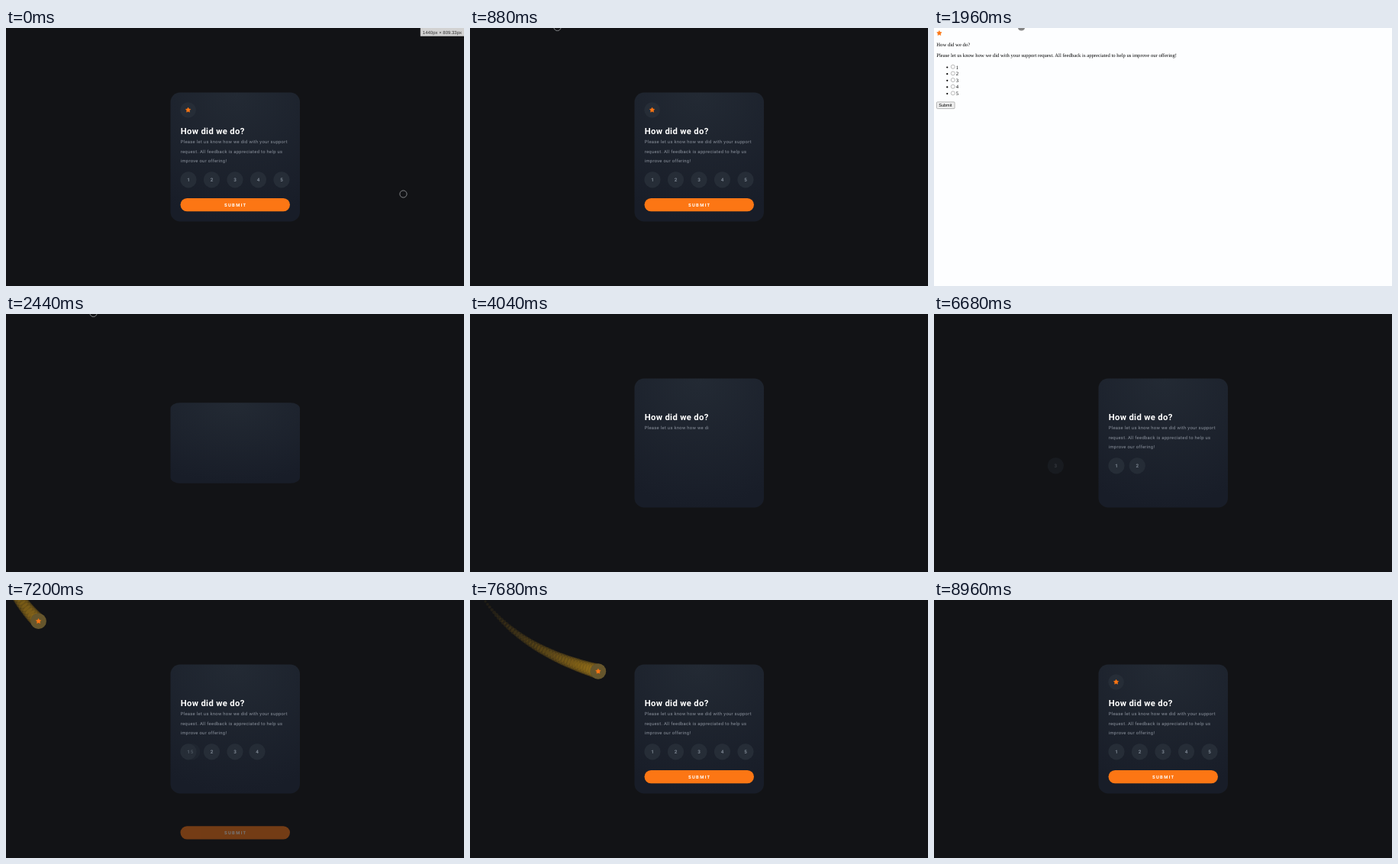
These frames come from a looping animation (600 px wide and 338 px high, 9 s). An HTML page:

```html
<!DOCTYPE html>
<html lang="en">
<head>
<meta charset="utf-8">
<title>Rating card</title>
<style>
  html, body { margin: 0; width: 100%; height: 100%; overflow: hidden; background: #121316; }
  svg { display: block; width: 100%; height: 100%; text-rendering: geometricPrecision; }
  text { white-space: pre; }
  .card { font-family: Roboto, sans-serif; }
  .title { font-size: 11.25px; font-weight: 700; letter-spacing: .33px; fill: #fff; }
  .copy { font-size: 5.83px; letter-spacing: .31px; fill: #8d949f; }
  .num { font-size: 6.3px; font-weight: 700; fill: #7c8591; text-anchor: middle; }
  .label { font-size: 5.83px; font-weight: 700; letter-spacing: 1.35px; fill: #fff; }
  .plain { font: 6.667px "Liberation Serif", serif; }
  .ui { font-family: "Liberation Sans", sans-serif; }
</style>
</head>
<body>
<svg viewBox="0 0 600 338">
  <defs>
    <radialGradient id="shade" cx=".5" cy="0" r="1">
      <stop offset="0" stop-color="#232a34"/>
      <stop offset="1" stop-color="#181d28"/>
    </radialGradient>
  </defs>
  <rect width="600" height="338" fill="#121316"/>
  <g class="card">
    <rect id="panel" x="215.5" y="84.5" width="169.5" height="169" rx="12.5" fill="url(#shade)"/>
    <text id="title" class="title" x="228.7" y="139">How did we do?</text>
    <g id="copy"></g>
    <g id="balls"></g>
    <g id="submit">
      <rect x="228.5" y="223" width="143.5" height="17.2" rx="8.6" fill="#fc7614"/>
      <text class="label" x="286" y="233.5">SUBMIT</text>
    </g>
    <g id="trail" fill="#c8941c"></g>
    <g id="icon">
      <circle r="10.3" fill="#262d37"/>
      <circle id="glow" r="10.3" fill="#c8941c"/>
      <path class="star" fill="#fc7614"/>
    </g>
  </g>
  <g id="plain" class="plain">
    <rect width="600" height="338" fill="#fdfeff"/>
    <path class="star" transform="translate(6.9 6.8)" fill="#fc7614"/>
    <text x="3.3" y="24.2">How did we do?</text>
    <text x="3.3" y="38.4">Please let us know how we did with your support request. All feedback is appreciated to help us improve our offering!</text>
    <g id="list"></g>
    <rect x="3.5" y="96.9" width="23.6" height="8.7" rx="1" fill="#efefef" stroke="#767676" stroke-width=".5"/>
    <text class="ui" x="6.2" y="103.2" font-size="5.56">Submit</text>
  </g>
  <g id="size" class="ui">
    <rect x="543" y="-1" width="58" height="11.7" fill="#d2d2d2" stroke="#a5a5a5" stroke-width=".5"/>
    <text x="545.8" y="7.8" font-size="6" fill="#333">1440px × 809.33px</text>
  </g>
  <circle id="cursor" r="4.6" fill="none"/>
</svg>
<script>
const LOOP = 9000, RELOAD = 1960, STYLED = 2200;
const TYPE_START = 3235, CHAR_MS = 28;
const COMET = { start: 7040, duration: 1050, life: 700, gap: 14 };
const LINES = [
  'Please let us know how we did with your support',
  'request. All feedback is appreciated to help us',
  'improve our offering!'
];
const $ = id => document.getElementById(id);
const clamp = v => Math.min(1, Math.max(0, v));
const lerp = (a, b, u) => a + (b - a) * u;

function add(parent, tag, attrs = {}, text = '') {
  const el = document.createElementNS('http://www.w3.org/2000/svg', tag);
  for (const key in attrs) el.setAttribute(key, attrs[key]);
  el.textContent = text;
  return parent.appendChild(el);
}

// CSS "ease": cubic-bezier(.25, .1, .25, 1)
function ease(x) {
  if (x <= 0 || x >= 1) return clamp(x);
  const bez = (a, b, s) => 3 * (1 - s) ** 2 * s * a + 3 * (1 - s) * s * s * b + s ** 3;
  let lo = 0, hi = 1;
  for (let i = 0; i < 20; i++) {
    const mid = (lo + hi) / 2;
    if (bez(.25, .25, mid) < x) lo = mid; else hi = mid;
  }
  return bez(.1, 1, lo);
}

const points = Array.from({ length: 10 }, (_, i) => {
  const r = i % 2 ? 1.75 : 3.3, a = i * Math.PI / 5;
  return `${(r * Math.sin(a)).toFixed(2)} ${(-r * Math.cos(a)).toFixed(2)}`;
});
for (const star of document.querySelectorAll('.star')) {
  star.setAttribute('d', `M${points.join('L')}Z`);
  star.setAttribute('stroke', '#fc7614');
  star.setAttribute('stroke-width', '.6');
  star.setAttribute('stroke-linejoin', 'round');
}

const copy = LINES.map((_, i) => add($('copy'), 'text', { class: 'copy', x: 228.7, y: 151.4 + i * 12.2 }));

const balls = [1, 2, 3, 4, 5].map((n, i) => {
  const x = 239 + i * 30.5, y = 51 + i * 8.65;
  const ball = add($('balls'), 'g');
  add(ball, 'circle', { cx: x, cy: 198.8, r: 10.6, fill: '#262d37' });
  add(ball, 'text', { class: 'num', x, y: 200.8 }, n);
  add($('list'), 'circle', { cx: 17.3, cy: y + .5, r: 1.1 });
  add($('list'), 'circle', { cx: 24.8, cy: y - .2, r: 2.5, fill: '#fff', stroke: '#767676', 'stroke-width': .5 });
  add($('list'), 'text', { x: 28.7, y: y + 2.5 }, n);
  return ball;
});

// element, start, duration, horizontal and vertical offset at the start
const entrances = [
  [$('title'), 2850, 400, 0, -125],
  ...balls.map((ball, i) => [ball, 6096 + i * 250, 400, -208, 0]),
  [$('submit'), 7100, 400, 0, 125]
];

const puffs = Array.from({ length: COMET.duration / COMET.gap }, () => add($('trail'), 'circle'));

function cometAt(t) {
  const p = 1 - (1 - clamp((t - COMET.start) / COMET.duration)) ** 1.6;
  const curve = (a, b, c) => (1 - p) ** 2 * a + 2 * p * (1 - p) * b + p * p * c;
  return [curve(10, 66, 238.6), curve(-14, 84, 107.5)];
}

function drawComet(t) {
  const landed = t < RELOAD;
  const [x, y] = cometAt(landed ? LOOP : t);
  $('icon').setAttribute('transform', `translate(${x} ${y})`);
  $('icon').setAttribute('opacity', landed || t >= COMET.start ? 1 : 0);
  $('glow').setAttribute('opacity', landed ? 0 : .4 * clamp((8750 - t) / 700));
  puffs.forEach((puff, i) => {
    const born = COMET.start + i * COMET.gap;
    const left = 1 - (t - born) / COMET.life;
    const alive = left > 0 && left <= 1;
    puff.setAttribute('opacity', alive ? .06 + .15 * left : 0);
    if (!alive) return;
    const [px, py] = cometAt(born);
    puff.setAttribute('cx', px);
    puff.setAttribute('cy', py);
    puff.setAttribute('r', 10 * left);
  });
}

function drawCursor(t) {
  const cursor = $('cursor'), unstyled = t >= RELOAD && t < STYLED;
  const u = ease((t - 80) / 320);
  let x = lerp(520.5, 538, u), y = lerp(217.5, 229, u);
  if (t >= 560) [x, y] = t < 600 ? [330, 112] : [114.5, -1];
  cursor.setAttribute('cx', x);
  cursor.setAttribute('cy', y);
  cursor.setAttribute('fill', unstyled ? '#858585' : 'none');
  cursor.setAttribute('stroke', unstyled ? 'none' : '#85878a');
  cursor.setAttribute('opacity', t < 2840 ? 1 : 0);
}

function render(t) {
  const ready = t < RELOAD;
  $('size').style.display = t < 880 ? '' : 'none';
  $('plain').style.display = !ready && t < STYLED ? '' : 'none';

  const grow = ready ? 1 : ease((t - 2260) / 500);
  $('panel').setAttribute('transform', `translate(0 ${169 * (1 - grow)}) scale(1 ${grow})`);

  for (const [el, start, duration, dx, dy] of entrances) {
    const u = ready ? 1 : ease((t - start) / duration);
    el.setAttribute('transform', `translate(${dx * (1 - u)} ${dy * (1 - u)})`);
    el.setAttribute('opacity', u);
  }

  let typed = ready ? Infinity : Math.max(0, Math.floor((t - TYPE_START) / CHAR_MS));
  LINES.forEach((line, i) => {
    copy[i].textContent = line.slice(0, Math.max(0, typed));
    typed -= line.length + 1;
  });

  drawComet(t);
  drawCursor(t);
}

const begin = performance.now();
function tick() {
  render((performance.now() - begin) % LOOP);
  requestAnimationFrame(tick);
}
tick();
</script>
</body>
</html>
```
